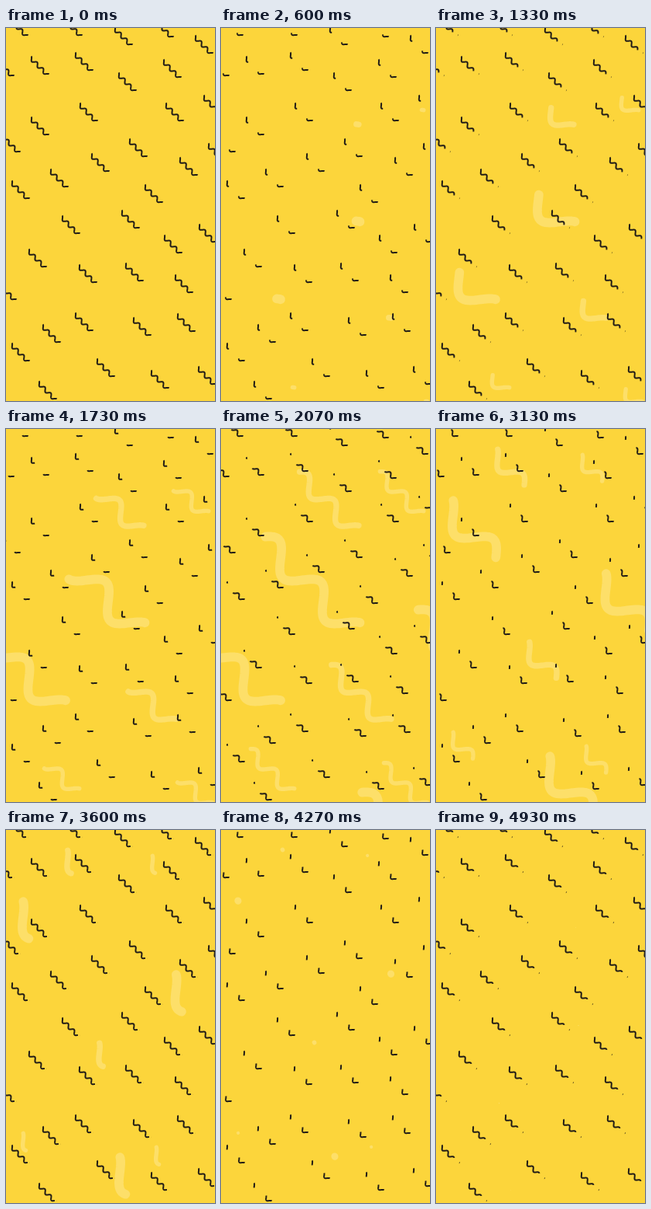
An HTML page with a canvas that plays this animation: 270x480 px, repeating every 4.99 s.

```html
<!DOCTYPE html>
<html lang="en">
<head>
<meta charset="utf-8">
<title>Squiggle pattern</title>
<style>
  html, body { margin: 0; width: 100%; height: 100%; overflow: hidden; background: #fcd53b; }
  canvas { display: block; width: 100vw; height: 100vh; }
</style>
</head>
<body>
<canvas id="stage"></canvas>
<script>
const W = 270, H = 480, LOOP = 4990, FPS = 15;
const BG = '#fcd53b', INK = '#211c16', PALE = '#fddf69';

const canvas = document.getElementById('stage');
const ctx = canvas.getContext('2d');
const dpr = window.devicePixelRatio || 1;
canvas.width = W * dpr;
canvas.height = H * dpr;

// Start points of the small dark squiggles
const DARK_SPAN = 23, DARK_WIDTH = 2, DARK_TIME = 1188;
const dark = [
  [6, -10], [76, -10], [141, 2], [194, -8], [245, 13],
  [-12, 42], [33, 40], [90, 35], [146, 61], [204, 44],
  [256, 90], [96, 100], [207, 100], [33, 118], [-4, 140],
  [160, 146], [111, 165], [225, 170], [262, 152], [58, 185],
  [8, 200], [180, 205], [73, 245], [150, 238], [205, 270],
  [250, 256], [30, 288], [95, 308], [155, 306], [219, 321],
  [-9, 330], [90, 370], [165, 376], [222, 371], [48, 385],
  [8, 409], [118, 429], [188, 444], [249, 439], [43, 458]
].map(([x, y]) => [x - 0.4, y - 3.6]);

// Pale squiggles: x, y, span
const PALE_TIME = 2 * DARK_TIME;
const pale = [
  [19.5, 87, 165], [217, 181, 165], [144.5, 416, 165], [-83, 187, 165],
  [78, 23, 103], [119, 271, 104],
  [188, 31, 76], [21, 388, 76], [193, 406, 76]
];

// Diagonal wave of three periods in a unit square
function wave(s) {
  const bend = 0.068 * (Math.cos(6 * Math.PI * s) - 1);
  return [s + bend, s - bend];
}

// Resample the wave at equal arc lengths
const STEPS = 120;
const { points, length } = (() => {
  const fine = 1200, raw = [], dist = [0];
  for (let i = 0; i <= fine; i++) {
    raw.push(wave(i / fine));
    if (i) dist.push(dist[i - 1] + Math.hypot(raw[i][0] - raw[i - 1][0], raw[i][1] - raw[i - 1][1]));
  }
  const length = dist[fine], points = [];
  for (let i = 0, j = 0; i <= STEPS; i++) {
    while (j < fine && dist[j] < length * i / STEPS) j++;
    points.push(raw[j]);
  }
  return { points, length };
})();

function pointAt(f) {
  const p = Math.min(1, Math.max(0, f)) * STEPS;
  const i = Math.min(STEPS - 1, Math.floor(p)), r = p - i;
  const [ax, ay] = points[i], [bx, by] = points[i + 1];
  return [ax + (bx - ax) * r, ay + (by - ay) * r];
}

function strokePart(x, y, span, from, to) {
  if (to <= from) return;
  const put = (f, op) => {
    const [px, py] = pointAt(f);
    ctx[op](x + px * span, y + py * span);
  };
  ctx.beginPath();
  put(from, 'moveTo');
  for (let i = Math.floor(from * STEPS) + 1; i < to * STEPS; i++) put(i / STEPS, 'lineTo');
  put(to, 'lineTo');
  ctx.stroke();
}

// Rounded ends stay inside the trimmed range
function drawPale(x, y, span, from, to) {
  const len = span * length, extent = (to - from) * len;
  if (extent < 0.3) return;
  const width = Math.min(span * 0.071, extent * 0.95);
  const inset = width / 2 / len;
  ctx.lineWidth = width;
  strokePart(x, y, span, from + inset, to - inset);
}

const enter = (p, power) => 1 - Math.pow(p, power);
const leave = (p, power) => Math.pow(1 - p, power);

function draw(t) {
  ctx.setTransform(canvas.width / W, 0, 0, canvas.height / H, 0, 0);
  ctx.fillStyle = BG;
  ctx.fillRect(0, 0, W, H);
  ctx.lineJoin = 'round';

  const q = (t / PALE_TIME) % 2;
  const from = q < 1 ? enter(q, 2.12) : 0;
  const to = q < 1 ? 1 : leave(q - 1, 2.2);
  ctx.strokeStyle = PALE;
  ctx.lineCap = 'round';
  for (const [x, y, span] of pale) drawPale(x, y, span, from, to);

  const p = (t / DARK_TIME) % 1;
  const head = enter(p, 2.2), tail = leave(p, 2.2);
  ctx.strokeStyle = INK;
  ctx.lineWidth = DARK_WIDTH;
  ctx.lineCap = 'butt';
  for (const [x, y] of dark) {
    strokePart(x, y, DARK_SPAN, 0, Math.min(tail, head));
    strokePart(x, y, DARK_SPAN, Math.max(tail, head), 1);
    if (tail > head) strokePart(x, y, DARK_SPAN, head, tail);
  }
}

const origin = performance.now();
function tick() {
  const t = (performance.now() - origin) % LOOP;
  draw(Math.floor((t + 4) * FPS / 1000) * 1000 / FPS);
  requestAnimationFrame(tick);
}
tick();
</script>
</body>
</html>
```
